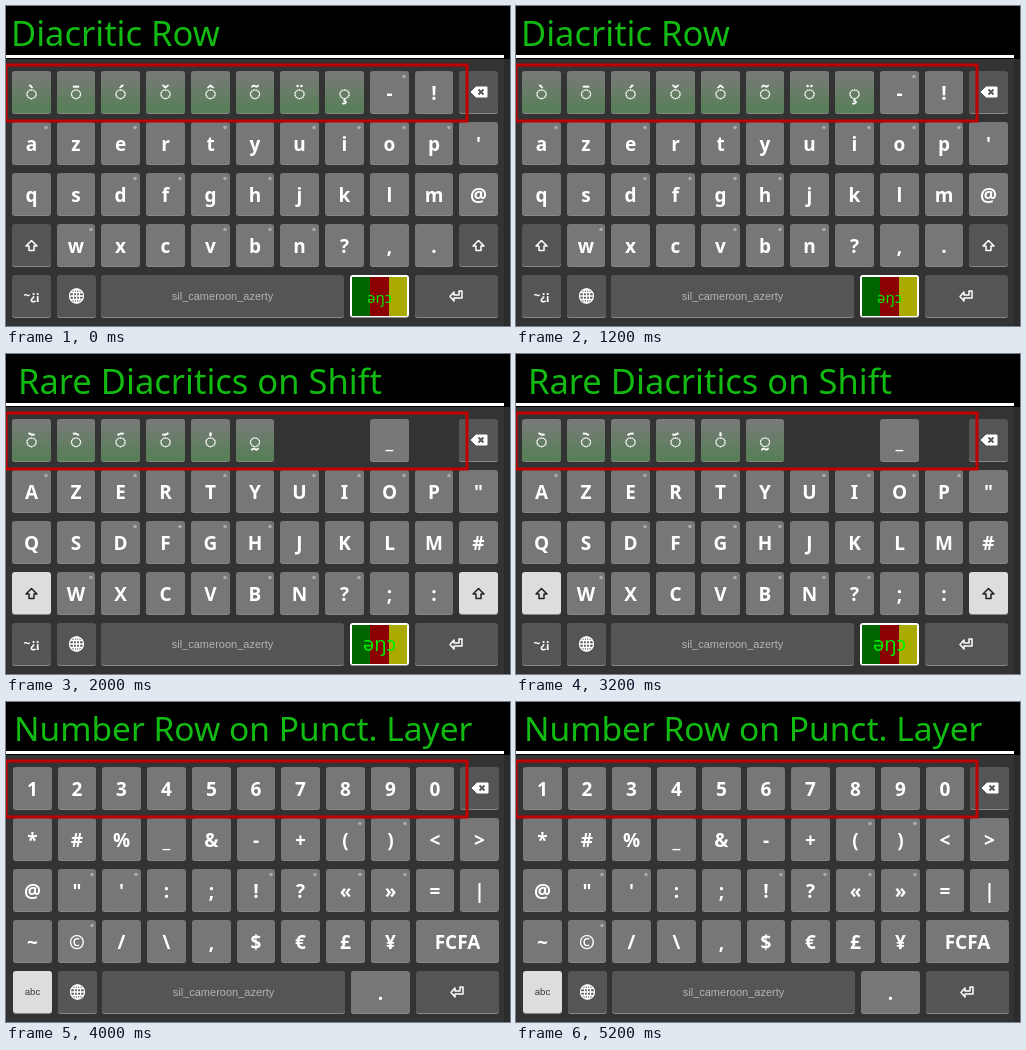
Animation, 504 px wide and 320 px high, one loop 6000 ms. Source, as an HTML page:

```html
<!DOCTYPE html>
<html lang="en">
<head>
<meta charset="utf-8">
<title>Keyboard layers</title>
<style>
html, body { margin: 0; width: 100%; height: 100%; overflow: hidden; background: #000; }
svg { display: block; width: 504px; height: 320px; }
text { font-family: "Noto Sans", "Open Sans", sans-serif; }
.title { fill: #11bb11; font-weight: 500; }
.cap { fill: #fff; font-size: 19px; font-weight: 600; text-anchor: middle; }
.mark { font-size: 20px; font-weight: 500; stroke: #fff; stroke-width: .5px; }
.small { font: 11px Arial, "Liberation Sans", sans-serif; fill: #b4b4b4; text-anchor: middle; }
.layer { visibility: hidden; animation: show 6s step-end infinite; }
.layer:nth-of-type(2) { animation-delay: -4s; }
.layer:nth-of-type(3) { animation-delay: -2s; }
@keyframes show { 0% { visibility: visible; } 33.3333%, 100% { visibility: hidden; } }
</style>
</head>
<body>
<svg id="stage" viewBox="0 0 504 320">
  <defs>
    <linearGradient id="green" x2="0" y2="1"><stop stop-color="#7a7a7a"/><stop offset="1" stop-color="#557f55"/></linearGradient>
    <path id="shift" d="M0-5.5 5.5 0H2.5V4.5H-2.5V0H-5.5Z" fill="none" stroke-width="1.5" stroke-linejoin="round"/>
    <path id="enter" d="M6-5H3V-1H-2V-4L-6 0.5-2 5V2H6Z" fill="none" stroke="#fff" stroke-width="1.5" stroke-linejoin="round"/>
    <g id="back">
      <path d="M-8 0-3-5H8V5H-3Z" fill="#fff" stroke="#fff" stroke-linejoin="round"/>
      <path d="M-.5-2.5 4.5 2.5M4.5-2.5-.5 2.5" stroke="#555" stroke-width="1.8"/>
    </g>
    <g id="globe" fill="none" stroke="#fff" stroke-width="1.3">
      <circle r="7"/><ellipse rx="3.2" ry="7"/><path d="M0-7V7M-7 0H7M-6-3.5H6M-6 3.5H6"/>
    </g>
  </defs>
  <path d="M0 53H504V320H0Z" fill="#333"/>
  <path d="M498 53H504V320H498Z" fill="#2b2b2b"/>
  <path d="M0 49H498V52H0Z" fill="#fff"/>
</svg>
<script>
const DARK = '#555', LIT = '#ddd', PLAIN = '#777', GREEN = 'url(#green)';
const edge = i => 5.9 + 44.75 * i;
const colX = i => Math.round(edge(i));
const colW = i => Math.round(edge(i) + 38.6) - colX(i);
const rowY = r => 65 + 51 * r;
const esc = s => s.replace(/&/g, '&amp;').replace(/</g, '&lt;');

const box = (x, y, w, fill) =>
  `<rect x="${x}" y="${y + 1}" width="${w}" height="42" rx="3" fill="#888"/>` +
  `<rect x="${x}" y="${y}" width="${w}" height="42" rx="3" fill="${fill}"/>`;
const label = (s, x, y, cls = 'cap', extra = '') =>
  `<text class="${cls}" x="${x}" y="${y}" ${extra}>${esc(s)}</text>`;
const icon = (id, x, y, extra = '') =>
  `<use href="#${id}" transform="translate(${x} ${y})" ${extra}/>`;

function key(s, i, r, { dot = false, fill = PLAIN, w = colW(i), cls = 'cap' } = {}) {
  const x = colX(i), y = rowY(r);
  return box(x, y, w, fill) + label(s, x + w / 2, y + 29, cls) +
    (dot ? `<circle cx="${x + 34}" cy="${y + 5.5}" r="1.8" fill="#aaa"/>` : '');
}

// Cells are separated by spaces; "." in dots means none, "*" a long-press dot.
function row(cells, r, start = 0, dots = '') {
  return cells.split(' ').map((s, i) => key(s, i + start, r, { dot: dots[i] === '*' })).join('');
}

const marks = codes => codes.map((c, i) =>
  key('\u25cc' + String.fromCodePoint(c), i, 0, { fill: GREEN, cls: 'cap mark' })).join('');

function shiftKeys(on) {
  return [0, 10].map(i => box(colX(i), rowY(3), 39, on ? LIT : DARK) +
    icon('shift', colX(i) + 19.5, 240, `stroke="${on ? '#222' : '#fff'}"`)).join('');
}

const flag = size =>
  box(344, 269, 59, '#fff') +
  `<path d="M346 271H364V310H346Z" fill="#006400"/><path d="M364 271H383V310H364Z" fill="#8b0000"/>` +
  `<path d="M383 271H401V310H383Z" fill="#aaaa00"/>` +
  label('əŋɔ', 373.5, 297, 'cap', `style="fill:#0e0;font-size:${size}px;font-weight:400"`);

const bottom = (first, extra) =>
  first + box(51, 269, 39, DARK) + icon('globe', 70.5, 290) +
  box(95, 269, 243, DARK) + label('sil_cameroon_azerty', 216.5, 294, 'small') +
  extra + box(409, 269, 83, DARK) + icon('enter', 450, 290);

const punctKey = box(6, 269, 39, DARK) +
  label('~¿¡', 25.5, 294, 'cap', 'style="font-size:12px"');
const backKey = box(453, 65, 39, DARK) + icon('back', 473, 86);
const letterDots = ['*.*.*.****.', '..****'];

const letters = (rows, dots3) =>
  row(rows[0], 1, 0, letterDots[0]) + row(rows[1], 2, 0, letterDots[1]) + row(rows[2], 3, 1, dots3);

const lower =
  marks([0x300, 0x304, 0x301, 0x30c, 0x302, 0x303, 0x308, 0x327]) + row('- !', 0, 8, '*.') +
  letters(["a z e r t y u i o p '", 'q s d f g h j k l m @', 'w x c v b n ? , .'], '*..***...') +
  shiftKeys(false) + bottom(punctKey, flag(15));

const upper =
  marks([0x1dc5, 0x1dc6, 0x1dc7, 0x1dc4, 0x30d, 0x330]) + row('_', 0, 8) +
  letters(['A Z E R T Y U I O P "', 'Q S D F G H J K L M #', 'W X C V B N ? ; :'], '*..****..') +
  shiftKeys(true) + bottom(punctKey, flag(20));

const punct =
  row('1 2 3 4 5 6 7 8 9 0', 0) +
  row('* # % _ & - + ( ) < >', 1, 0, '.......**..') +
  row('@ " \' : ; ! ? « » = |', 2, 0, '.**..****..') +
  row('~ © / \\ , $ € £ ¥', 3, 0, '.*') + key('FCFA', 9, 3, { w: 83 }) +
  bottom(box(6, 269, 39, LIT) + label('abc', 25.5, 293, 'small', 'style="fill:#333;font-size:9.5px"'),
    box(344, 269, 59, PLAIN) + label('.', 373.5, 298));

const layer = (title, x, y, size, keys, shift = 0) =>
  `<g class="layer">${label(title, x, y, 'title', `font-size="${size}"`)}` +
  `<g transform="translate(${shift} 0)">${keys}${backKey}</g></g>`;

document.getElementById('stage').insertAdjacentHTML('beforeend',
  layer('Diacritic Row', 5, 40, 34.5, lower) +
  layer('Rare Diacritics on Shift', 12, 40, 34.5, upper) +
  layer('Number Row on Punct. Layer', 8, 39, 33.5, punct, 1) +
  '<rect x="0" y="59" width="461" height="56" fill="none" stroke="#c00000" stroke-width="3"/>');
</script>
</body>
</html>
```
